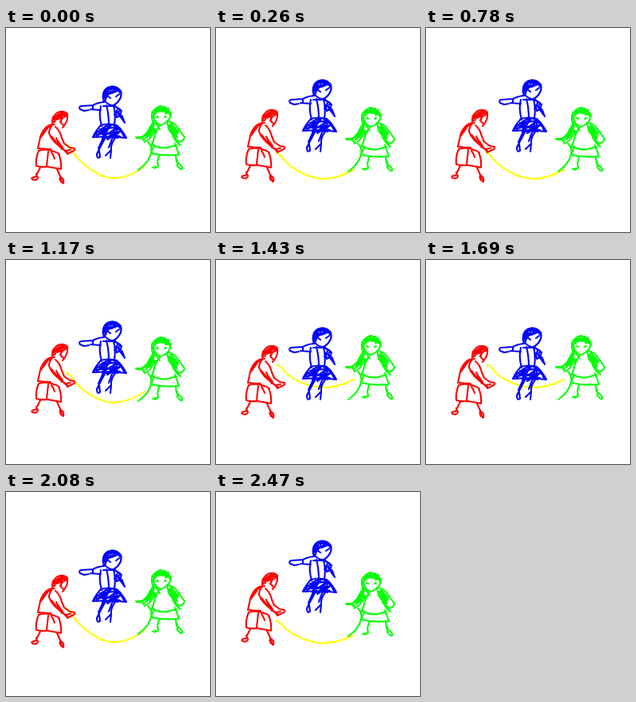
An HTML page that plays this animation: 256x256 px, repeating every 2.6 s.

```html
<!DOCTYPE html>
<html lang="en">
<head>
<meta charset="utf-8">
<title>Jump rope</title>
<style>
  html, body { margin: 0; width: 100%; height: 100%; overflow: hidden; background: #fff; }
  svg { display: block; width: 100vw; height: 100vh; }
  path { fill: none; stroke-width: 2.1; stroke-linecap: round; stroke-linejoin: round; }

  /* Every leg of the swing takes four 130 ms steps; the loop ends early and snaps back. */
  g, .rope { animation: bob 2600ms steps(4, end) infinite; }
  .red { stroke: #f00; --rise: -4px; }
  .blue { stroke: #00f; --rise: -16px; }
  .green { stroke: #0f0; --rise: 4px; }
  .rope { stroke: #ff0; animation-name: swing; }

  @keyframes bob {
    0%, 40%, 80% { transform: translateY(0); }
    20%, 100% { transform: translateY(var(--rise)); }
    60% { transform: translateY(calc(-1 * var(--rise))); }
  }
  @keyframes swing {
    0%, 40%, 80% { d: path("M75 146C80 148 84 155 87 160C97 172 117 188 135 188.5C150 188 161 183 174 173"); }
    20%, 100% { d: path("M76 167C81 168 84 172 87 175C97 183 117 190 135 190C150 190 160 187 172 182"); }
    60% { d: path("M77.5 127C82 128 85.5 132 87 135C99 145 117 150.5 136 150.5C150 150.5 161 147 173 142"); }
  }
</style>
</head>
<body>
<svg viewBox="0 0 256 256">
  <path class="rope" d="M75 146C80 148 84 155 87 160C97 172 117 188 135 188.5C150 188 161 183 174 173"/>

  <g class="red">
    <!-- hair and face -->
    <path d="M58 119Q58 110 65 106Q73 103 77 108L77 114Q75 121 71 125"/>
    <path d="M58 117Q62 107 75 106Q66 107 59 115Q67 107 77 109Q68 109 61 115L73 108L63 115L75 111Q70 112 69 117"/>
    <path d="M59 112L58 119L62 117M70 114L68 118L72 122"/>
    <!-- blouse and arms -->
    <path d="M61 121Q53 121 49 126Q43 133 42 142L40 151"/>
    <path d="M57 122L48 128L44 137L54 123L45 135L51 126"/>
    <path d="M58 122Q54 126 54 132Q56 138 61 143Q68 150 77 156"/>
    <path d="M62 124Q68 129 70 138L73 145L80 150L86 151Q87 154 83 155L77 158L75 154L81 153"/>
    <path d="M57 136L66 147L76 156M63 138L70 152M65 142L71 150M41 151Q48 152 56 152"/>
    <!-- skirt -->
    <path d="M41 154Q51 151 60 155Q65 156 67 159"/>
    <path d="M41 154Q37 163 38 173Q44 175 52 174L69 177Q70 167 66 158"/>
    <path d="M53 155L51 173M57 156Q60 160 61 164"/>
    <!-- legs -->
    <path d="M43 175L37 187Q31 187 33 190Q39 192 40 188L38 183"/>
    <path d="M64 177L68 186L70 193Q73 198 72 190L69 187Q66 188 69 193"/>
  </g>

  <g class="blue">
    <!-- hair and face -->
    <path d="M123 93Q119 81 127 75Q137 70 144 79Q146 86 141 92Q136 98 132 97Q126 95 123 90"/>
    <path d="M122 89Q121 77 131 74Q141 73 144 82Q139 75 131 76Q123 79 125 90Q121 82 128 77Q136 75 142 80"/>
    <path d="M125 90L128 79L126 87L132 77L128 84L138 76L132 82L142 78M127 85L131 88M138 86L142 83"/>
    <!-- left arm -->
    <path d="M122 93Q114 94 109 97L94 98Q91 99 93 102L98 104L104 103M106 102L119 103M109 97L109 101"/>
    <!-- body -->
    <path d="M119 98Q116 109 120 123M126 97Q129 108 129 122M122 98L136 98L143 102"/>
    <path d="M135 98Q138 108 136 121M140 102L136 109"/>
    <!-- right arm -->
    <path d="M137 98L145 104L143 110L139 112L138 107L144 103M141 108L149 119L146 111L141 106"/>
    <!-- skirt -->
    <path d="M119 122Q112 130 109 137L130 136L151 138Q146 128 139 122Q129 119 119 122"/>
    <path d="M110 136Q121 122 133 121Q144 126 148 136M113 137Q125 122 140 126Q139 135 121 139L125 123L116 134L132 122L121 137L139 125L127 140L144 129L134 138"/>
    <path d="M112 134L145 130M114 130L143 136M118 127L140 138M128 124L121 133L140 132"/>
    <!-- legs -->
    <path d="M125 137L118 150L114 158Q114 165 118 162L117 154M122 138L116 151"/>
    <path d="M137 138Q131 146 132 153L131 163M132 153L125 160M133 139L129 150"/>
  </g>

  <g class="green">
    <!-- hair and face -->
    <path d="M184 117Q181 107 186 103Q193 95 202 101Q209 107 205 114Q201 120 194 122Q186 119 185 110"/>
    <path d="M183 108Q187 100 196 102Q203 101 207 109Q199 103 190 104Q186 106 184 113M184 106L189 101L187 108L195 98L191 105L200 99L196 105L204 101L200 107L207 106"/>
    <path d="M189 111L191 112M199 112L201 111"/>
    <!-- left arm and braid -->
    <path d="M187 118Q181 122 178 130L171 137L163 137Q164 139 171 138L174 143L180 139L188 127"/>
    <path d="M186 116L181 124L177 133L186 121L179 134L169 137M184 122L187 131L185 126L181 134L174 139"/>
    <!-- body -->
    <path d="M193 122Q187 131 185 141L182 148M188 120L193 127"/>
    <!-- right arm and braid -->
    <path d="M204 117Q212 119 216 126L224 137Q223 142 217 143L212 138"/>
    <path d="M202 117L204 126L213 135L216 130L207 120L204 127L212 137L215 132L207 124L209 134L215 137L205 122L211 127M209 135L214 143L219 147"/>
    <!-- skirt -->
    <path d="M183 146Q193 152 203 150L214 147M186 147L182 157Q198 161 217 159L212 145"/>
    <!-- rope end -->
    <path d="M178 143Q184 149 182 157Q179 169 166 178"/>
    <!-- legs -->
    <path d="M192 160L190 168L191 174L184 175M190 174L187 176"/>
    <path d="M213 160L214 168L220 173Q223 178 219 177L215 173L215 166"/>
  </g>
</svg>
</body>
</html>
```
